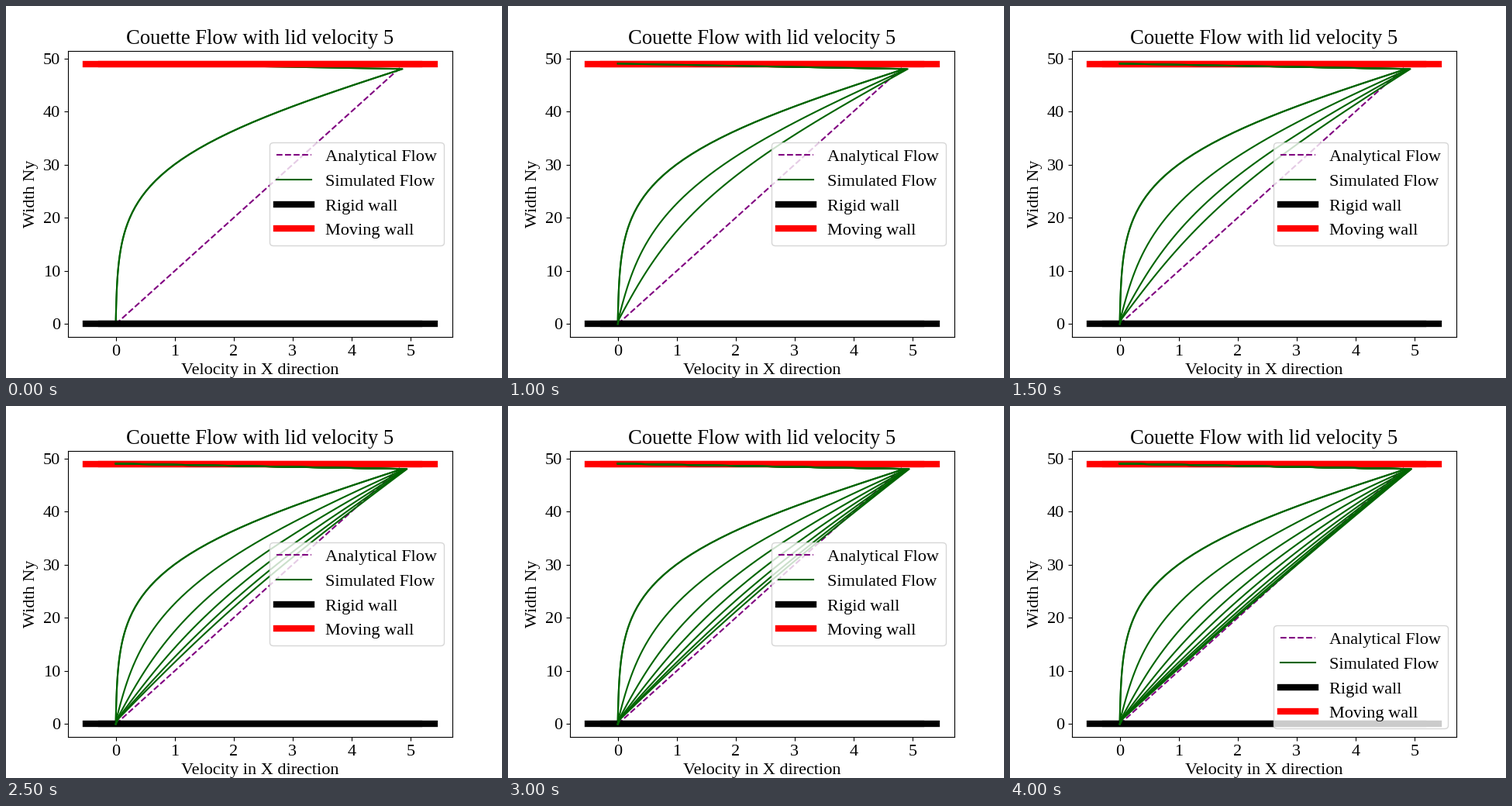
These frames come from a looping animation (640x480 px, 4500 ms). A matplotlib script:

```python
import numpy as np
import matplotlib.pyplot as plt
from matplotlib.animation import FuncAnimation

plt.rcParams.update({"font.family": "Liberation Serif", "font.size": 16})

NY = 50
LID = 5
STEPS = 9
# Viscosity times time: at the first profile, and between two profiles.
START, GAIN = 103.5, 100
LID_LEVEL = NY - 1.02

y = np.arange(NY)


def profile(k):
    """Start-up Couette flow; the walls sit halfway between nodes."""
    gap = NY - 2
    eta = (y - 0.5) / gap
    n = np.arange(1, 60)[:, None]
    decay = np.exp(-(n * np.pi / gap) ** 2 * (START + GAIN * k))
    modes = 2 * (-1.0) ** n / (n * np.pi) * decay * np.sin(n * np.pi * eta)
    u = LID * (eta + modes.sum(axis=0))
    u[0] = u[-1] = 0
    return u


def plot_flow(k):
    return ax.plot(profile(k), y, color="darkgreen", label="Simulated Flow")[0]


def plot_wall(span, level, color, label):
    return ax.plot(span, [level, level], color=color, lw=6, label=label)[0]


def plot_base():
    flow = plot_flow(0)
    span = ax.get_xlim()
    rigid = plot_wall(span, 0, "black", "Rigid wall")
    moving = plot_wall(span, LID_LEVEL, "red", "Moving wall")
    return [flow, rigid, moving]


fig, ax = plt.subplots(figsize=(6.4, 4.8), dpi=100)

exact = ax.plot(LID * y / NY, y, "--", color="purple", label="Analytical Flow")
# The second pass widens the walls to the new axis limits.
handles = exact + plot_base()
plot_base()
curves = [plot_flow(k) for k in range(1, STEPS)]

ax.set_title(f"Couette Flow with lid velocity {LID}")
ax.set_xlabel("Velocity in X direction")
ax.set_ylabel("Width Ny")
ax.set_xticks(range(6))
ax.set_yticks(range(0, 51, 10))
legend = ax.legend(handles=handles, loc="center right", handletextpad=0.82)


def update(i):
    for k, curve in enumerate(curves, 1):
        curve.set_visible(k <= i)
    legend.set_loc("lower right" if i == STEPS - 1 else "center right")
    return curves + [legend]


anim = FuncAnimation(fig, update, frames=STEPS, interval=500, repeat=True)
plt.show()
```
